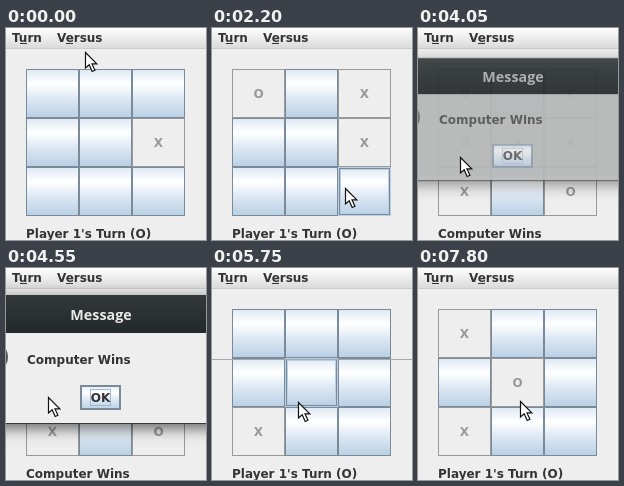
An HTML page with a canvas for the animation above (8000 ms loop, 200 by 212 pixels).

```html
<!DOCTYPE html>
<html lang="en">
<head>
<meta charset="utf-8">
<title>Noughts and crosses</title>
<style>
html, body { margin: 0; width: 100%; height: 100%; overflow: hidden; background: #eee; }
canvas { display: block; }
</style>
</head>
<body>
<canvas id="stage" width="200" height="212"></canvas>
<script>
const ctx = document.getElementById('stage').getContext('2d');
const LOOP = 8000, STEP = 50;
const BOLD = 'bold 12px "DejaVu Sans", sans-serif';
const TITLE = 'bold 14.3px "Open Sans", sans-serif';
const DARK = '#333', EDGE = '#7a8a99', PALE = '#b8cfe5', GREY = '#999', PANEL = '#eee';
const WIN = 3850, OPEN = 3950, OK = 5500, CLOSE = 5700;

// The pointer glides from its start to each stop in turn
const start = { x: 79, y: 24 };
const glides = [
  { from: 0, to: 300, x: 49, y: 66 },
  { from: 1800, to: 2200, x: 133, y: 160 },
  { from: 3050, to: 3350, x: 42, y: 129 },
  { from: 4550, to: 4750, x: 110, y: 149 },
  { from: 4750, to: 4950, x: 86, y: 134 },
  { from: 6050, to: 6150, x: 88, y: 135 },
  { from: 6450, to: 6550, x: 74, y: 132 },
  { from: 6700, to: 6900, x: 98, y: 131 },
  { from: 7650, to: 7800, x: 102, y: 133 }
];
// Each game opens with a cross; every click is answered one step later
const games = [
  { at: 0, first: 5, turns: [{ at: 1350, cell: 0, reply: 2 }, { at: 2650, cell: 8, reply: 4 }, { at: 3800, cell: 3, reply: 6 }] },
  { at: CLOSE, first: 6, turns: [{ at: 7200, cell: 4, reply: 0 }] }
];

function fill(x, y, w, h, color) {
  ctx.fillStyle = color;
  ctx.fillRect(x, y, w, h);
}

function frame(x, y, w, h, color) {
  ctx.strokeStyle = color;
  ctx.lineWidth = 1;
  ctx.strokeRect(x + 0.5, y + 0.5, w - 1, h - 1);
}

function text(s, x, y, color = DARK, align = 'left', font = BOLD) {
  ctx.font = font;
  ctx.textAlign = align;
  ctx.fillStyle = color;
  ctx.fillText(s, x, y);
}

function gradient(y, h, stops) {
  const g = ctx.createLinearGradient(0, y, 0, y + h);
  for (const [at, color] of stops) g.addColorStop(at, color);
  return g;
}

function button(x, y, w, h, pressed) {
  fill(x, y, w, h, pressed ? '#c8ddf2' : gradient(y, h,
    [[0, '#dde8f3'], [0.3, '#fff'], [0.6, '#dde8f3'], [1, PALE]]));
  frame(x, y, w, h, EDGE);
  if (pressed) frame(x + 1, y + 1, w - 2, h - 2, EDGE);
}

function menu(s, x) {
  text(s, x, 14);
  const left = ctx.measureText(s[0]).width, right = ctx.measureText(s.slice(0, 2)).width;
  fill(Math.round(x + left), 15, Math.round(right - left), 1, DARK);
}

function drawBoard(t, tip) {
  const game = games.filter(g => g.at <= t).pop();
  const marks = { [game.first]: 'X' };
  for (const { at, cell, reply } of game.turns) {
    if (t >= at) marks[cell] = 'O';
    if (t >= at + STEP) marks[reply] = 'X';
  }
  const active = t < OPEN || t >= CLOSE;
  const pressed = game.turns.some(({ at }) => t >= at - 2 * STEP && t < at);

  for (let i = 0; i < 9; i++) {
    const w = 53, h = 49, x = 20 + i % 3 * w, y = 41 + Math.floor(i / 3) * h;
    if (marks[i]) {
      frame(x, y, w, h, GREY);
      text(marks[i], x + 26.5, y + 29, GREY, 'center');
      continue;
    }
    const over = active && tip.x >= x && tip.x < x + w && tip.y >= y && tip.y < y + h;
    button(x, y, w, h, over && pressed);
    if (over && !pressed)
      [PALE, EDGE, PALE].forEach((c, d) => frame(x + d, y + d, w - 2 * d, h - 2 * d, c));
  }
}

function drawDialog(scale, alpha, pressed) {
  ctx.save();
  ctx.globalAlpha = alpha;
  ctx.translate(0, 91.5);
  ctx.scale(1, scale);
  ctx.translate(0, -91.5);
  ctx.shadowColor = 'rgba(0,0,0,.6)';
  ctx.shadowBlur = 14;
  ctx.shadowOffsetY = 4;
  fill(-30, 27, 260, 129, '#33383a');
  ctx.shadowColor = 'transparent';
  fill(0, 28, 200, 37, gradient(28, 37, [[0, '#32383a'], [1, '#24292b']]));
  fill(0, 65, 200, 90, PANEL);
  text('Message', 95, 52, '#e8e8e6', 'center', TITLE);
  ctx.beginPath();
  ctx.arc(-14, 89, 14.5, 0, 7);
  ctx.strokeStyle = '#555';
  ctx.lineWidth = 3;
  ctx.stroke();
  text('Computer Wins', 21, 96);
  button(74, 117, 41, 25, pressed);
  frame(75, 118, 39, 23, EDGE);
  frame(84, 121, 21, 17, '#a3b8cc');
  text('OK', 94.5, 134, DARK, 'center');
  ctx.restore();
}

function drawPointer({ x, y }) {
  ctx.save();
  ctx.translate(x + 0.5, y + 0.5);
  ctx.fillStyle = '#fff';
  ctx.strokeStyle = '#111';
  ctx.lineWidth = 1.2;
  const arrow = new Path2D('M0 0V15.5L3.7 12.3L6.7 19L9.4 17.8L6.5 11.4H11.3Z');
  ctx.fill(arrow);
  ctx.stroke(arrow);
  ctx.restore();
}

function tipAt(t) {
  let { x, y } = start;
  for (const g of glides) {
    const u = Math.min(1, Math.max(0, (t - g.from) / (g.to - g.from)));
    x += (g.x - x) * u;
    y += (g.y - y) * u;
  }
  return { x: Math.round(x), y: Math.round(y) };
}

// Unfolds with a slight overshoot
function unfold(u) {
  const v = Math.min(u, 1) - 1;
  return 1 + 2.7 * v ** 3 + 1.7 * v ** 2;
}

function draw(t) {
  const tip = tipAt(t);
  fill(0, 0, 200, 212, PANEL);
  fill(0, 0, 200, 20, gradient(0, 20, [[0, '#fff'], [1, '#dadada']]));
  fill(0, 20, 200, 1, '#ccc');
  menu('Turn', 6);
  menu('Versus', 51);
  drawBoard(t, tip);
  text(t >= WIN && t < CLOSE ? 'Computer Wins' : "Player 1's Turn (O)", 20, 210);

  if (t >= OPEN && t < CLOSE) {
    const u = (t - OPEN + STEP) / 450;
    drawDialog(unfold(u), Math.min(1, u * 2), t >= OK);
  } else if (t === CLOSE) {
    drawDialog(0.5, 0.8, false);
  } else if (t === CLOSE + STEP) {
    fill(0, 91, 200, 1, '#a3a9b0');
  }
  drawPointer(tip);
}

function tick() {
  draw(Math.floor(performance.now() % LOOP / STEP) * STEP);
  requestAnimationFrame(tick);
}
tick();
</script>
</body>
</html>
```
